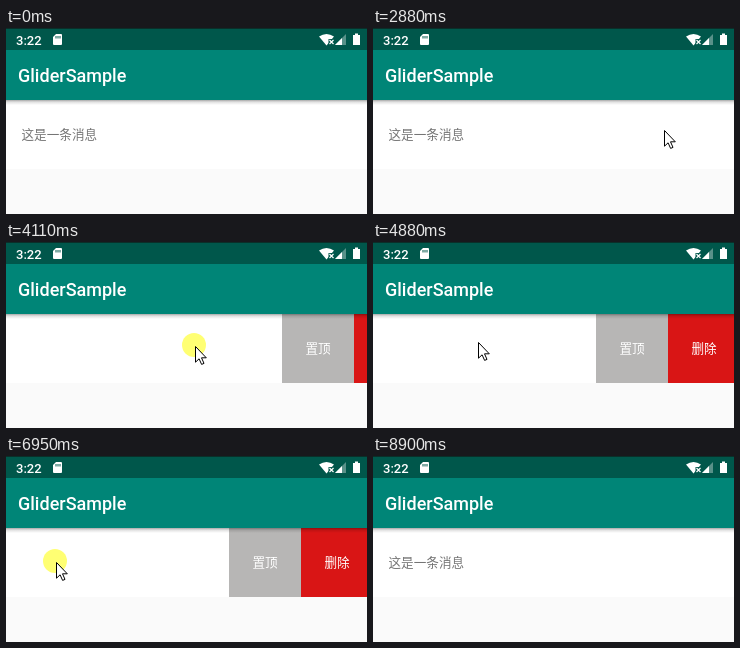
An HTML page for the animation above (9780 ms loop, 361 px wide and 186 px high).

```html
<!DOCTYPE html>
<html lang="zh">
<head>
<meta charset="utf-8">
<title>Swipe row</title>
<style>
  html, body { margin: 0; width: 100%; height: 100%; overflow: hidden; background: #fafafa; }
  svg { display: block; }
  text { font-family: Roboto, "Noto Sans CJK SC", "Noto Sans CJK", sans-serif; fill: #fff; }
  .cjk { font-family: "Noto Sans CJK SC", "Noto Sans CJK", sans-serif; font-size: 12.6px; }
  .mid { text-anchor: middle; }
  .bold { font-weight: 500; }
</style>
</head>
<body>
<svg width="361" height="186" viewBox="0 0 361 186">
  <defs>
    <linearGradient id="shade" x2="0" y2="1">
      <stop offset="0" stop-color="#000" stop-opacity=".34"/>
      <stop offset=".4" stop-color="#000" stop-opacity=".12"/>
      <stop offset="1" stop-color="#000" stop-opacity="0"/>
    </linearGradient>
  </defs>
  <rect width="361" height="186" fill="#fafafa"/>

  <g id="row">
    <rect width="367" height="69" y="72" fill="#fff"/>
    <text class="cjk" x="15.5" y="111.3" style="fill:#757575">这是一条消息</text>
    <rect x="367" y="72" width="72" height="69" fill="#b7b6b5"/>
    <text class="cjk mid" x="403" y="111.3">置顶</text>
    <rect x="439" y="72" width="72" height="69" fill="#d91515"/>
    <text class="cjk mid" x="475" y="111.3">删除</text>
  </g>

  <rect y="72" width="361" height="5" fill="url(#shade)"/>
  <rect y="22" width="361" height="50" fill="#008577"/>
  <rect width="361" height="22" fill="#00574b"/>
  <rect width="361" height="1" fill="#0a2f29"/>
  <text class="bold" x="10" y="16.6" font-size="13">3:22</text>
  <text class="bold" x="12" y="54" font-size="18">GliderSample</text>

  <g fill="#fff">
    <path d="M50 6H55Q56 6 56 7V16Q56 17 55 17H48Q47 17 47 16V9Z"/>
    <path d="M50 8V10.5M52 8V10.5M54 8V10.5" stroke="#00574b"/>
    <path d="M313 8.6Q320.5 3.4 328 8.6L320.5 17.4Z"/>
    <rect x="322.5" y="11" width="7" height="7" fill="#00574b"/>
    <path d="M323.5 12l4 4m0-4l-4 4" stroke="#fff" stroke-width="1.2"/>
    <path d="M340 6V17H329Z" opacity=".35"/>
    <path d="M336 10V17H329Z"/>
    <path d="M349 5.5H352V7H354V17H347V7H349Z"/>
  </g>

  <circle id="touch" r="12" fill="#ffff73"/>
  <path id="arrow" d="M.5 .5V16.2L4.1 12.8L6.6 18.4L9 17.4L6.5 11.8H11.3Z"
        fill="#fff" stroke="#000" stroke-linejoin="round"/>
</svg>
<script>
const LOOP = 9780, OPEN = 144;
const phases = [];
let last = { x: 249, y: 190, shift: 0, down: false };

// Each phase starts from the pose where the one before it ended.
function add(kind, start, end, steps, x, y, shift = last.shift, via) {
  const to = { x, y, shift, down: kind === "press" || kind === "drag" };
  phases.push({ kind, start, end, steps, from: last, to, via });
  last = to;
}

add("press", 200, 1040, 13, 296, 105);
add("drag", 1250, 1600, 6, 247, 102, 43);
add("release", 2000, 2270, 5, 253, 113, 0);
add("press", 2600, 3090, 8, 295, 104, 0, { x: 299, y: 97 });
add("drag", 3230, 4110, 14, 189, 104, 91);
add("release", 4310, 4880, 9, 105, 100, OPEN, { x: 160, y: 176 });
add("drag", 5150, 5620, 8, 131, 99, 118);
add("release", 6080, 6490, 7, 50, 106, OPEN);
add("drag", 6950, 7560, 10, 140, 104, 54);
add("release", 7890, 8290, 7, 198, 116, 0);
add("leave", 8490, 8900, 7, 41, 158);

const [row, touch, arrow] = ["row", "touch", "arrow"].map(id => document.getElementById(id));
const move = (el, x, y) => el.setAttribute("transform", `translate(${Math.round(x)} ${Math.round(y)})`);
const show = (el, on) => el.setAttribute("visibility", on ? "visible" : "hidden");
const mix = (a, b, k) => a + (b - a) * k;
const smooth = k => k * k * (3 - 2 * k);

function along({ from, to, via }, axis, k) {
  if (!via) return mix(from[axis], to[axis], k);
  return mix(mix(from[axis], via[axis], k), mix(via[axis], to[axis], k), k);
}

function stateAt(t) {
  const phase = phases.findLast(p => t >= p.start);
  if (!phase) return phases[0].from;
  const { kind, start, end, steps, from, to } = phase;
  const step = Math.min(steps, Math.floor((t - start) / (end - start) * (steps - 1) + 1e-3) + 1);
  const done = step === steps;

  // The pointer rests for one step when a button goes up or down.
  const lag = kind === "release" || (kind === "drag" && !from.down) ? 1 : 0;
  const k = kind === "leave" ? Math.min(1, step / (steps - 1)) : (step - lag) / (steps - lag);
  const slide = kind === "release" ? smooth(Math.min(1, step / 4) ** 0.8) : k;
  return {
    x: along(phase, "x", k),
    y: along(phase, "y", k),
    shift: mix(from.shift, to.shift, slide),
    down: kind === "drag" || (kind === "press" && done),
    gone: kind === "leave" && done
  };
}

function draw(t) {
  const s = stateAt(t);
  move(row, -s.shift, 0);
  move(arrow, s.x, s.y);
  move(touch, s.x - 1, s.y - 1);
  show(touch, s.down);
  show(arrow, !s.gone);
}

const begin = performance.now();
function tick() {
  draw((performance.now() - begin) % LOOP);
  requestAnimationFrame(tick);
}
tick();
</script>
</body>
</html>
```
